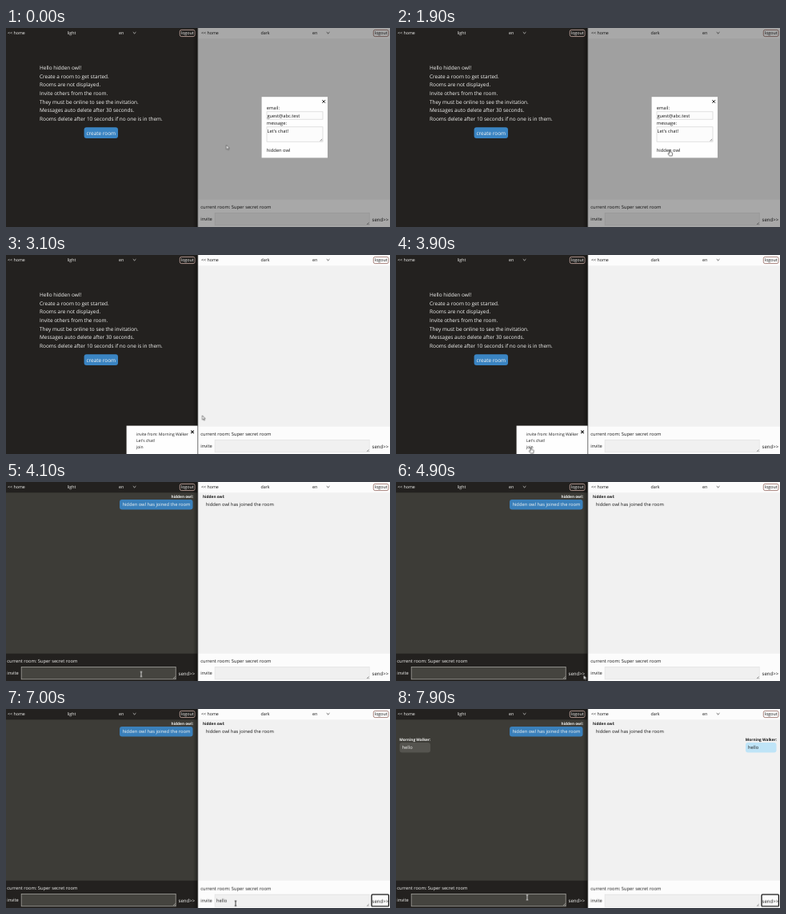
An HTML page that plays this animation: 480x249 px, repeating every 8 s.

```html
<!DOCTYPE html>
<html lang="en">
<head>
<meta charset="utf-8">
<title>Chat rooms</title>
<style>
html, body { margin: 0; width: 100%; height: 100%; overflow: hidden; background: #23211f; }
svg { display: block; width: 480px; height: 249px; }
text { font: 5.75px "Open Sans", "Noto Sans", sans-serif; fill: currentColor; text-rendering: geometricPrecision; }
.nav text { font-size: 5.3px; }
.intro text { font-size: 6.46px; }
.popup text { font-size: 5px; }
text.who { font-size: 4.75px; font-weight: 700; }
text.send { font-size: 6.1px; }
.dark { color: #f4f4f2; --edge: #d0b0a8; --field: #45443f; --rim: #a3a29c; }
.light { color: #161616; --edge: #94665e; --field: #f0f0f0; --rim: #e3e3e3; }
.line { fill: none; stroke: currentColor; stroke-width: .7; }
.field { fill: var(--field); stroke: var(--rim); stroke-width: .8; }
.ring { fill: none; stroke: #111; stroke-width: 1.3; }

/* 8 s loop: 1.25% is 100 ms */
.t { opacity: 0; animation: 8s step-end infinite; }
.intro { animation-name: intro; }
.modal { animation-name: modal; }
.popup { animation-name: popup; }
.room { animation-name: room; }
.focus { animation-name: focus; }
.typed { animation-name: typed; }
.sent { animation-name: sent; }
.sendring { animation-name: sendring; }
.arrow { animation-name: arrow; }
.hand { animation-name: hand; }
.beam { animation-name: beam; }
.foot { animation: nudge 8s step-end infinite; }
.mouse { animation: mouse 8s infinite; }
tspan { fill-opacity: 0; animation: 8s step-end infinite; }
.k1 { animation-name: k1; }
.k2 { animation-name: k2; }
.k3 { animation-name: k3; }

@keyframes intro { 0% { opacity: 1 } 51.25% { opacity: 0 } }
@keyframes modal { 0% { opacity: 1 } 26.25% { opacity: 0 } }
@keyframes popup { 26.25% { opacity: 1 } 51.25% { opacity: 0 } }
@keyframes room { 51.25%, 100% { opacity: 1 } }
@keyframes focus { 63.75% { opacity: 1 } 87.5% { opacity: 0 } }
@keyframes typed { 76.25% { opacity: 1 } 90% { opacity: 0 } }
@keyframes sent { 90%, 100% { opacity: 1 } }
@keyframes sendring { 87.5%, 100% { opacity: 1 } }
@keyframes k1 { 80%, 100% { fill-opacity: 1 } }
@keyframes k2 { 81.25%, 100% { fill-opacity: 1 } }
@keyframes k3 { 83.75%, 100% { fill-opacity: 1 } }
@keyframes nudge { 76.25%, 100% { transform: translateY(.7px) } }
@keyframes arrow { 0% { opacity: 1 } 12.5% { opacity: 0 } 26.25% { opacity: 1 } 43.75% { opacity: 0 } 61.25% { opacity: 1 } 62.5% { opacity: 0 } }
@keyframes hand { 12.5% { opacity: 1 } 26.25% { opacity: 0 } 43.75% { opacity: 1 } 51.25% { opacity: 0 } }
@keyframes beam { 51.25% { opacity: 1 } 61.25% { opacity: 0 } 62.5%, 100% { opacity: 1 } }
@keyframes mouse {
  0% { transform: translate(275.5px, 146.5px); color: #111; animation-timing-function: steps(5) }
  6.25% { transform: translate(308px, 169px); animation-timing-function: steps(4) }
  11.25% { transform: translate(340px, 157px); animation-timing-function: steps(1) }
  12.5% { transform: translate(342px, 153px); animation-timing-function: steps(3) }
  16.25%, 32.5% { transform: translate(342px, 152.4px); animation-timing-function: steps(9) }
  43.75% { transform: translate(168px, 239.5px); animation-timing-function: steps(1) }
  45% { transform: translate(168.5px, 240.5px); color: #111; animation-timing-function: step-end }
  51.25% { transform: translate(169px, 240.5px); color: #f4f4f4; animation-timing-function: steps(5) }
  57.5%, 58.75% { transform: translate(182px, 240px); color: #f4f4f4; animation-timing-function: steps(4) }
  63.75%, 96.25% { transform: translate(287px, 243.2px); color: #111; animation-timing-function: steps(2) }
  98.75%, 100% { transform: translate(164px, 235.8px); color: #f4f4f4 }
}
</style>
</head>
<body>
<svg viewBox="0 0 480 249">
  <defs>
    <linearGradient id="shade">
      <stop offset="0" stop-color="#000" stop-opacity="0"/>
      <stop offset="1" stop-color="#000" stop-opacity=".4"/>
    </linearGradient>
    <g id="nav" class="nav">
      <text x="2" y="8">&lt;&lt; home</text>
      <text x="141" y="8">en</text>
      <path class="line" d="M158.8 5.2l1.8 1.7 1.8-1.7"/>
      <rect x="217.3" y="2.4" width="18.8" height="8.2" rx="2" fill="none" stroke="var(--edge)" stroke-width=".8"/>
      <text x="226.7" y="8.2" text-anchor="middle">logout</text>
    </g>
    <g id="foot">
      <text x="1.2" y="226">current room: Super secret room</text>
      <text x="1.2" y="241.4">invite</text>
      <rect class="field" x="19.2" y="231.4" width="193" height="15.4"/>
      <path class="line" d="M209 246l2.6-2.6M210.6 246l1-1" opacity=".6"/>
      <text class="send" x="215.5" y="241.5">send&gt;&gt;</text>
    </g>
  </defs>

  <g class="dark">
    <rect width="240" height="249" fill="#23211f"/>
    <g class="intro t">
      <text x="42" y="52.1">Hello hidden owl!</text>
      <text x="42" y="62.7">Create a room to get started.</text>
      <text x="42" y="73.3">Rooms are not displayed.</text>
      <text x="42" y="83.9">Invite others from the room.</text>
      <text x="42" y="94.5">They must be online to see the invitation.</text>
      <text x="42" y="105.1">Messages auto delete after 30 seconds.</text>
      <text x="42" y="115.7">Rooms delete after 10 seconds if no one is in them.</text>
      <rect x="97.6" y="124.3" width="42.4" height="13.6" rx="3" fill="#3a84c2"/>
      <text x="118.8" y="133.6" text-anchor="middle">create room</text>
    </g>
    <g class="room t">
      <rect y="13.3" width="240" height="201.4" fill="#3d3c37"/>
      <text class="who" x="234" y="19.5" text-anchor="end">hidden owl:</text>
      <rect x="142" y="22" width="91.5" height="12.5" rx="3" fill="#3a80bb"/>
      <text x="145.4" y="30.3">hidden owl has joined the room</text>
      <use href="#foot"/>
    </g>
    <g class="sent t">
      <text class="who" x="4.2" y="40.2">Morning Walker:</text>
      <rect x="4.5" y="42" width="38.5" height="12.5" rx="3" fill="#55544f"/>
      <text x="7.6" y="50.4">hello</text>
    </g>
    <use href="#nav"/>
    <text x="82" y="8" text-anchor="middle" style="font-size:5.3px">light</text>
    <rect x="234" width="6" height="249" fill="url(#shade)"/>
  </g>

  <g class="popup t light">
    <rect x="150.6" y="213.6" width="89.2" height="36" fill="#fefefe"/>
    <text x="163" y="226">invite from: Morning Walker</text>
    <text x="163" y="233.8">Let's chat!</text>
    <text x="163" y="241.6">join</text>
    <path class="line" d="M231.2 219.6l3.6 3.6m0-3.6l-3.6 3.6" style="stroke-width:1.1"/>
  </g>

  <g class="light">
    <rect x="240" width="240" height="249" fill="#fcfcfc"/>
    <rect x="240" y="13.3" width="240" height="201.4" fill="#f1f1f1"/>
    <use href="#nav" x="242"/>
    <text x="324" y="8" text-anchor="middle" style="font-size:5.3px">dark</text>
    <g class="foot">
      <use href="#foot" x="242"/>
      <rect class="ring focus t" x="261.2" y="231.4" width="192.6" height="14.8" rx="1"/>
      <text class="typed t" x="263" y="241.4">h<tspan class="k1">e</tspan><tspan class="k2">l</tspan><tspan class="k3">lo</tspan></text>
      <rect class="ring sendring t" x="457" y="231.4" width="21.4" height="14.8" rx="1"/>
    </g>
    <g class="room t">
      <text class="who" x="246" y="19.5">hidden owl:</text>
      <text x="249.8" y="30.3">hidden owl has joined the room</text>
    </g>
    <g class="sent t">
      <text class="who" x="476" y="40.2" text-anchor="end">Morning Walker:</text>
      <rect x="437" y="42" width="38.5" height="12.5" rx="3" fill="#bfe4f7"/>
      <text x="440" y="50.4">hello</text>
    </g>
    <g class="modal t">
      <rect x="240" width="240" height="249" opacity=".335"/>
      <rect x="319.6" y="86.2" width="82.4" height="76.2" fill="#fefefe"/>
      <path class="line" d="M395.4 90.2l3.6 3.6m0-3.6l-3.6 3.6" style="stroke-width:1"/>
      <text x="325.8" y="102.2">email:</text>
      <rect x="326" y="104.8" width="70" height="9.4" fill="#fcfcfc" stroke="#d4d4d4" stroke-width=".7"/>
      <text x="326.4" y="111.7">guest@abc.test</text>
      <text x="325.8" y="121.2">message:</text>
      <rect x="326" y="123.8" width="70" height="18.4" fill="#fcfcfc" stroke="#d4d4d4" stroke-width=".7"/>
      <path class="line" d="M392.6 141.4l2.6-2.6M394.2 141.4l1-1" opacity=".6"/>
      <text x="326.4" y="130.7">Let's chat!</text>
      <text x="325.8" y="154.5">hidden owl</text>
    </g>
  </g>
  <path d="M239.8 0v249" stroke="#666" stroke-width=".8"/>

  <g class="mouse">
    <path class="arrow t" d="M0 0v5.4l1.3-1.2.9 2 .9-.4-.9-1.9h1.7z" fill="#fff" stroke="#333" stroke-width=".55"/>
    <path class="hand t" d="M-.5 .5q.6-.9 1.2 0v2.4l2.3.5q.9.3.7 1.3l-.5 2.9h-3.4l-2-2.8q.3-1 1.7 0z" fill="#fff" stroke="#222" stroke-width=".6"/>
    <path class="beam t line" d="M-1.3-3h2.6M0-3v6M-1.3 3h2.6" style="stroke-width:.8"/>
  </g>
</svg>
</body>
</html>
```
